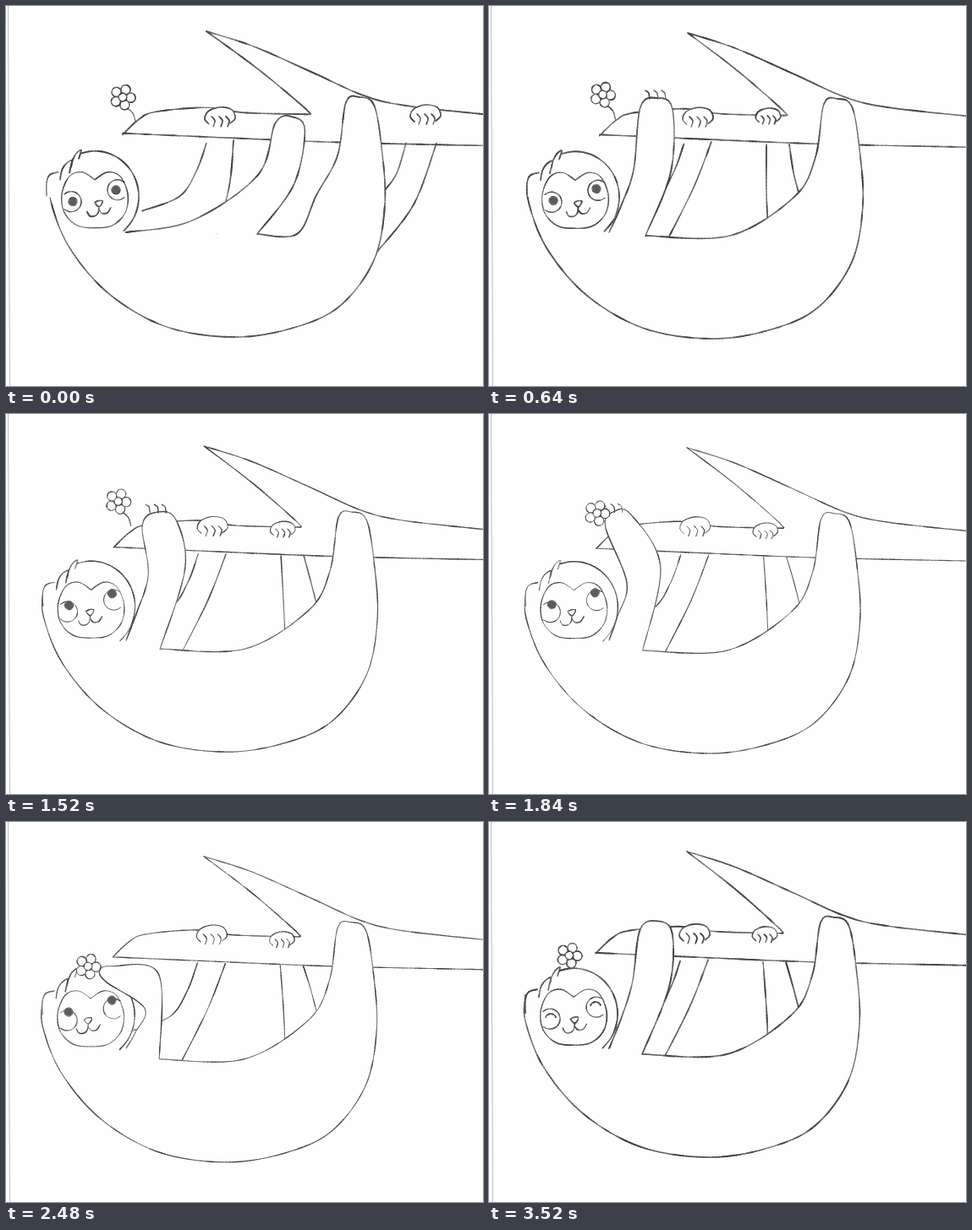
An HTML page with a canvas for the animation above (3.6 s loop, 564 by 450 pixels).

```html
<!DOCTYPE html>
<html lang="en">
<head>
<meta charset="utf-8">
<title>Sloth and flower</title>
<style>
html, body { margin: 0; width: 100%; height: 100%; overflow: hidden; background: #fefefe; }
canvas { display: block; }
</style>
</head>
<body>
<canvas id="stage" width="564" height="450"></canvas>
<script>
const ctx = document.getElementById('stage').getContext('2d');
const PAPER = '#fefefe';
const LOOP = 3600, STEP = 80;
const PICK = 1760, PLACED = 2480, SMILE = 3200;

// Near arm: time, hand x and y, elbow x and y, half width of the hand.
const ARM_KEYS = [
  [0, 336, 143, 319, 206, 18],
  [640, 198, 121, 193, 195, 19],
  [1520, 181, 128, 190, 186, 20],
  [PICK, 158, 118, 186, 188, 18],
  [2160, 132, 160, 170, 198, 12],
  [PLACED, 122, 180, 172, 200, 10],
  [3040, 195, 131, 188, 192, 19],
  [LOOP, 198, 129, 192, 192, 19]
];

// Resting shapes, as x,y lists.
const TRUNK = [234,41, 290,59, 360,90, 420,117, 470,129, 570,140];
const LIMB_TOP = [126,160, 145,142, 165,133, 225,128, 270,134, 346,136];
const LIMB_BOTTOM = [126,160, 240,165, 387,171, 570,175];
const BODY = [
  357,235, 382,188, 392,125, 408,119, 425,128, 434,178, 438,245, 425,312, 385,366,
  330,392, 260,403, 180,391, 112,352, 65,297, 43,242, 43,211
];
const HOOD_LEFT = [-57,-4, -57,-20, -53,-29, -43,-32];
const TUFT_FRONT = [-41,-23, -39,-34, -34,-42, -27,-46, -28,-38];
const TUFT_BACK = [-30,-31, -27,-44, -22,-54, -16,-58, -19,-48];
const HALF_FACE = [[0,-23], [15,-32], [30,-27], [39,-6], [36,16], [21,31]];
const FACE = [...HALF_FACE, [0,34], ...HALF_FACE.map(([x, y]) => [-x, y]).reverse()].flat();

const clamp = v => Math.min(1, Math.max(0, v));
const mix = (a, b, k) => a + (b - a) * k;
const hash = n => { const s = Math.sin(n * 127.1) * 43758.5453; return s - Math.floor(s); };

function noise(x) {
  const i = Math.floor(x), f = x - i;
  return mix(hash(i), hash(i + 1), f * f * (3 - 2 * f));
}

const place = (flat, x, y, s = 1) => flat.map((v, i) => v * s + (i % 2 ? y : x));

function arcPoints(x, y, rx, ry = rx, from = 0, to = Math.PI * 2) {
  const out = [];
  for (let i = 0; i <= 10; i++) {
    const a = mix(from, to, i / 10);
    out.push(x + rx * Math.cos(a), y + ry * Math.sin(a));
  }
  return out;
}

// Catmull-Rom curve through a flat point list.
function spline(flat) {
  const p = [], out = [];
  for (let i = 0; i < flat.length; i += 2) p.push([flat[i], flat[i + 1]]);
  const last = p.length - 1;
  for (let i = 0; i < last; i++) {
    const a = p[Math.max(i - 1, 0)], b = p[i], c = p[i + 1], d = p[Math.min(i + 2, last)];
    const n = Math.max(3, Math.ceil(Math.hypot(c[0] - b[0], c[1] - b[1]) / 4));
    const axis = (k, u) => {
      const quad = 2 * a[k] - 5 * b[k] + 4 * c[k] - d[k];
      const cubic = 3 * (b[k] - c[k]) + d[k] - a[k];
      return b[k] + 0.5 * u * (c[k] - a[k] + u * (quad + u * cubic));
    };
    for (let s = 0; s < n; s++) out.push([axis(0, s / n), axis(1, s / n)]);
  }
  out.push(p[last]);
  return out;
}

let weight = 1.5, seed = 0;

function pencil(flat, scale = 1) {
  const pts = spline(flat);
  seed += 31;
  for (let i = 1; i < pts.length; i++) {
    const tone = noise(seed + i * 0.4), grey = Math.round(122 - 60 * tone);
    ctx.strokeStyle = `rgb(${grey},${grey},${grey})`;
    ctx.lineWidth = weight * scale * (0.75 + 0.5 * tone);
    ctx.beginPath();
    ctx.moveTo(...pts[i - 1]);
    ctx.lineTo(...pts[i]);
    ctx.stroke();
  }
}

function erase(flat) {
  ctx.fillStyle = PAPER;
  ctx.beginPath();
  spline(flat).forEach(p => ctx.lineTo(...p));
  ctx.fill();
}

function patch(flat, scale) {
  erase(flat);
  pencil(flat, scale);
}

// The drawing slides left and sags; swing is the opening shift of the limbs.
function poseAt(t) {
  const sag = Math.sin(Math.PI * t / 4600) ** 2;
  const slide = 10 * Math.exp(-t / 700), lift = 11 * (1 - sag);
  return {
    sag, slide, lift,
    swing: 1 - clamp(t / 640),
    shift: (flat, a, b) => place(flat, slide * a, -lift * b)
  };
}

function armAt(t, { swing, slide, lift }) {
  const i = ARM_KEYS.findIndex(key => key[0] > t);
  const from = ARM_KEYS[i - 1], to = ARM_KEYS[i];
  const k = (t - from[0]) / (to[0] - from[0]);
  const [hx, hy, ex, ey, w] = from.slice(1).map((v, j) => mix(v, to[j + 1], k));
  const length = Math.hypot(hx - ex, hy - ey);
  const dx = (hx - ex) / length, dy = (hy - ey) / length;
  const side = (x, y, r) => [x + dy * r, y - dx * r];
  const neck = [142, 268], inner = side(ex, ey, 22);
  const tip = [hx + dx * 12, hy + dy * 12];
  const crotch = [181 + 106 * swing + slide, 281 - lift];
  const under = [mix(neck[0], inner[0], 0.5), mix(neck[1], inner[1], 0.5) + 5 + 15 * swing];
  const outline = [
    ...neck, ...under, ...inner, ...side(hx, hy, w), ...tip,
    ...side(hx, hy, -w), ...side(ex, ey, -22), ...crotch
  ];
  return { hand: [hx, hy], tip, neck, crotch, outline };
}

function drawGrip(x, y, size) {
  patch(place([-13,9, -18,3, -14,-6, 0,-11, 14,-8, 18,2, 12,8], x, y, size), 0.9);
  for (const dx of [-8, 1, 9]) pencil(place([dx - 2,0, dx + 2,5, dx,12], x, y, size), 0.9);
}

function drawBranchAndFarLimbs({ shift, slide, lift, swing: r }) {
  const footX = 326 + slide + 160 * r, footY = 139 - lift;
  const top = 170 - 0.7 * lift;

  pencil(shift([226,167, 214,200, 194,230, 150,247], 1.1, 0.4));
  pencil(shift([259,168, 238 + 16 * r,222, 208 + 30 * r,282], 1, 0.8));
  pencil([footX - 2 - 21 * r, top, 328 + 134 * r, 220 - 22 * r, 330 + 118 * r, 264 - 46 * r]);
  pencil([footX + 25 - 12 * r, top, 360 + 122 * r, 197 + 38 * r, 367 + 71 * r, 224 + 68 * r]);

  const trunk = shift(TRUNK, 0.3, 1), limb = shift(LIMB_TOP, 1.2, 0.7);
  const [tipX, tipY] = trunk, [forkX, forkY] = limb.slice(-2);
  pencil(trunk);
  pencil(limb);
  pencil(shift(LIMB_BOTTOM, 1.2, 0.85));
  pencil([
    tipX, tipY, mix(tipX, forkX, 0.5) + 1, mix(tipY, forkY, 0.5) - 4,
    forkX - 3, forkY - 6, forkX, forkY
  ]);
  drawGrip(243 + slide, 133 - 0.2 * lift, 1);
  drawGrip(footX, footY, mix(0.82, 1, r));
}

function drawBody({ shift }, { crotch, neck }) {
  const body = shift(BODY, 1, 1);
  const belly = [mix(crotch[0], body[0], 0.5) + 12, mix(crotch[1], body[1], 0.5) + 23];
  const outline = [...crotch, ...belly, ...body];
  erase([...outline, ...neck]);
  pencil(outline);
}

function drawEye(x, y, gaze, side, closed) {
  const middle = side < 0 ? 0 : Math.PI;
  pencil(arcPoints(x + side * 2, y, 12, 12, middle - 2.3, middle + 2.3), 0.75);
  if (closed) {
    pencil(arcPoints(x + side, y - 1, 6, 5, Math.PI * 1.05, Math.PI * 1.95), 0.9);
    return;
  }
  ctx.fillStyle = '#5c5c5c';
  ctx.beginPath();
  ctx.arc(x, y + gaze, 4.6, 0, 7);
  ctx.fill();
  pencil(arcPoints(x, y + gaze, 5), 0.6);
}

function drawHead(t, { sag, slide, lift }) {
  const x = 100 + slide / 2, y = 232 - 0.3 * lift;
  const at = shape => place(shape, x, y);
  const hood = arcPoints(0, -3, 52, 54, -1.9, 0.85);
  erase(at([...HOOD_LEFT, ...hood]));
  [HOOD_LEFT, TUFT_FRONT, TUFT_BACK, hood].forEach(shape => pencil(at(shape)));
  pencil(at(FACE), 0.8);
  drawEye(x - 26, y + 3, -10 * sag, -1, t >= SMILE);
  drawEye(x + 25, y - 11, -10 * sag, 1, t >= SMILE);
  const muzzle = shape => pencil(place(shape, x - 8 * sag, y - 2 * sag), 0.9);
  muzzle([0,4, 4,2, 9,2, 8,6, 5,9, 2,7, 0,4]);
  muzzle([-9,15, -6,20, 0,20, 4,16, 5,9]);
  muzzle([5,13, 9,17, 15,16, 19,10]);
}

function drawNearArm(t, { outline, tip }) {
  patch(outline);
  if (t < 480 || t >= 1920) return;
  for (const dx of [-11, -1, 8]) pencil(place([dx - 3,-9, dx + 1,-6, dx + 2,1], ...tip), 0.8);
}

function drawFlower(t, { slide }, { hand }) {
  let x = 132 + 0.6 * slide, y = 103 + 0.5 * slide;
  if (t < PICK) {
    pencil(place([4,12, 12,19, 15,29], x, y), 0.8);
  } else if (t <= PLACED) {
    [x, y] = [hand[0] - 25, hand[1] - 9];
  } else {
    [x, y] = [95, 171 - 13 * clamp((t - PLACED) / 560)];
  }
  for (let i = 0; i < 5; i++) {
    const a = -2.45 + i * Math.PI * 0.4;
    patch(arcPoints(x + 9.5 * Math.cos(a), y + 9.5 * Math.sin(a), 5.6), 0.8);
  }
  patch(arcPoints(x, y, 4.8), 0.8);
}

function draw(t) {
  const pose = poseAt(t), arm = armAt(t, pose);
  weight = 1.45 + 0.27 * Math.cos((t - 300) / LOOP * Math.PI * 2);
  seed = t;
  ctx.fillStyle = PAPER;
  ctx.fillRect(0, 0, 564, 450);
  ctx.lineCap = ctx.lineJoin = 'round';

  ctx.strokeStyle = '#bdbdbd';
  ctx.lineWidth = 1;
  ctx.beginPath();
  ctx.moveTo(2.5, 0);
  ctx.lineTo(4.5, 450);
  ctx.stroke();

  drawBranchAndFarLimbs(pose);
  drawBody(pose, arm);
  drawHead(t, pose);
  drawNearArm(t, arm);
  drawFlower(t, pose, arm);
}

const start = performance.now();
let shown = -1;
function tick() {
  const elapsed = Math.max(0, performance.now() - start);
  const t = Math.floor(elapsed % LOOP / STEP) * STEP;
  if (t !== shown) draw(shown = t);
  requestAnimationFrame(tick);
}
tick();
</script>
</body>
</html>
```
